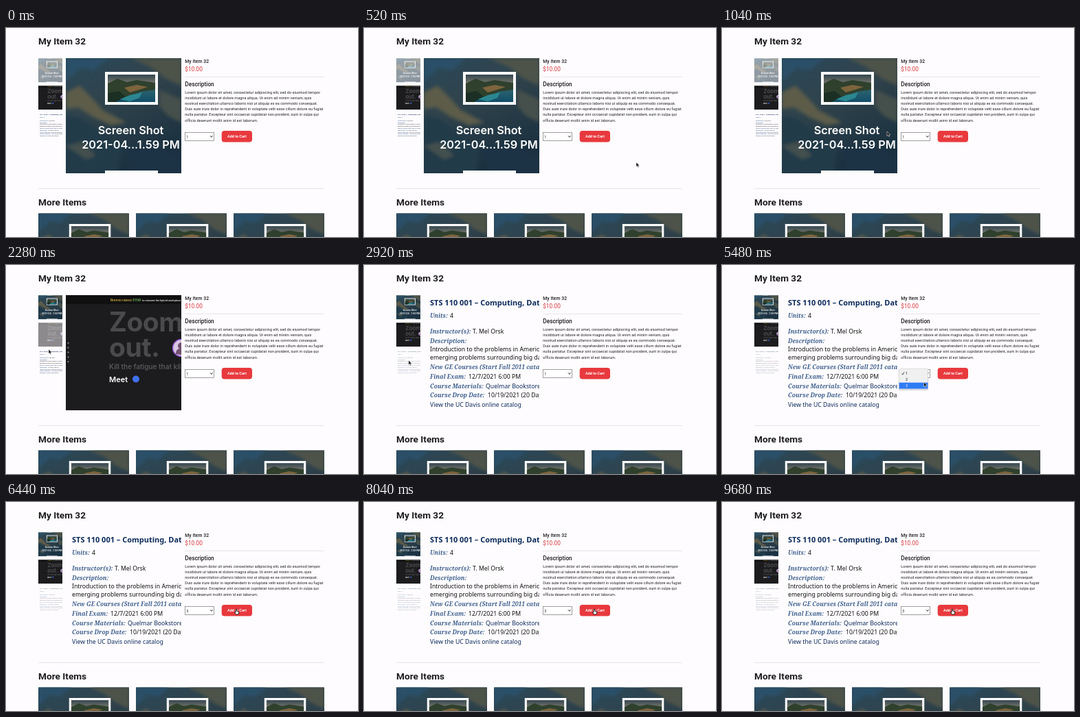
Recreate the animation shown at these times as an HTML page. Size 512 px wide and 305 px high, loop 9920 ms.

```html
<!DOCTYPE html>
<html lang="en">
<head>
<meta charset="utf-8">
<title>Item page</title>
<style>
  html, body { margin: 0; width: 100%; height: 100%; overflow: hidden; background: #fefcfe; }
  svg { display: block; }
  text { white-space: pre; }
  .ui { font-family: Roboto, sans-serif; fill: #1d1c1e; }
  .inter { font-family: Inter, sans-serif; font-weight: 600; }
  .course { font: 8.7px "Noto Sans", sans-serif; fill: #111; }
  .course .label { font: italic bold 8.5px "Noto Serif", serif; fill: #3d5f8c; }
  .course .navy { fill: #0b2a5b; }
  .course .heading { font-size: 11px; font-weight: 700; }
  .body { font-size: 5.46px; letter-spacing: .00938em; }
  .title { font-size: 13.65px; font-weight: 700; }
  .medium { font-weight: 500; }
  .rule { stroke: #dddcde; stroke-width: .7; }
</style>
</head>
<body>
<svg width="512" height="305" viewBox="0 0 512 305">
  <defs>
    <linearGradient id="land" x1="0" y1="0" x2=".5" y2="1">
      <stop offset="0" stop-color="#2a4859"/>
      <stop offset=".45" stop-color="#30434c"/>
      <stop offset="1" stop-color="#1b3140"/>
    </linearGradient>
    <linearGradient id="sky" x1="0" y1="0" x2="0" y2="1">
      <stop offset="0" stop-color="#34454f"/>
      <stop offset=".3" stop-color="#71736a"/>
      <stop offset=".5" stop-color="#2e6670"/>
      <stop offset="1" stop-color="#124d68"/>
    </linearGradient>
    <filter id="soft"><feGaussianBlur stdDeviation="2.5"/></filter>

    <g id="window">
      <rect width="77" height="48" fill="#fbfbfb"/>
      <rect x="4" y="4" width="69" height="40" fill="url(#sky)"/>
      <path d="M4 17 18 10 32 15 46 12 73 16V26L52 29 38 35 22 38 4 41Z" fill="#2f402d"/>
      <path d="M28 23 46 19 62 22 50 26 36 30Z" fill="#7d643d"/>
      <path d="M4 31 20 28 30 36 16 44H4Z" fill="#1b2f24"/>
      <path d="M22 40 36 34 54 30 50 38 36 43Z" fill="#2a8791"/>
    </g>

    <symbol id="image0" viewBox="0 0 168 168">
      <rect width="168" height="168" fill="url(#land)"/>
      <g filter="url(#soft)">
        <path d="M0 0H62L40 18 22 14 0 34Z" fill="#2c5067"/>
        <path d="M0 50 20 40 38 58 54 76 88 94 66 98 40 86 18 72 0 74Z" fill="#5c5b48"/>
        <path d="M94 0H168V40L146 30 122 12Z" fill="#4d5248"/>
        <path d="M136 46 168 60V94L148 84 136 70Z" fill="#45504b"/>
        <path d="M0 84 22 88 46 106 80 134 76 168H0Z" fill="#203a4a"/>
        <path d="M84 134 120 126 168 140V168H96Z" fill="#1c3344"/>
        <path d="M0 128 24 122 44 142 30 148Z" fill="#43504d"/>
      </g>
      <use href="#window" x="57" y="20"/>
      <use href="#window" x="57" y="164"/>
      <g class="inter" font-size="16.3" fill="#fff" text-anchor="middle">
        <text x="94.5" y="111">Screen Shot</text>
        <text x="94.5" y="132">2021-04...1.59 PM</text>
      </g>
    </symbol>

    <symbol id="image1" viewBox="0 0 168 168">
      <rect width="168" height="168" fill="#1c1b1e"/>
      <rect width="168" height="13" fill="#101011"/>
      <path d="M3.5 69V99" stroke="#99989c" stroke-width="1.8" stroke-dasharray="1.8 5"/>
      <g class="inter">
        <text x="65" y="8.6" font-size="4.7" fill="#d9b23c">Brenvo raises <tspan fill="#6fa65a">$15M</tspan></text>
        <text x="111" y="8.6" font-size="3.6" fill="#eee">to reinvent the hybrid workplace</text>
        <g fill="#4a494c" font-size="39" font-weight="700" letter-spacing="-.5">
          <text x="63" y="52.5">Zoom</text>
          <text x="63" y="89.5">out.</text>
        </g>
        <text x="63" y="108" font-size="10" fill="#58575a">Kill the fatigue that kills</text>
        <text x="63" y="127" font-size="11" fill="#fff">Meet</text>
      </g>
      <circle cx="102" cy="122.5" r="5" fill="#3f70ee"/>
      <circle cx="168" cy="77" r="12.5" fill="#d9c5e4" stroke="#8a4fd0" stroke-width="1.5"/>
      <path d="M160 86Q160 79 165 78A5 5 0 1 1 171 78L174 88Z" fill="#70506d"/>
    </symbol>

    <symbol id="image2" viewBox="0 0 168 168">
      <rect width="168" height="168" fill="#fefcfe"/>
      <g class="course">
        <text class="navy heading" x="9" y="15">STS 110 001 – Computing, Data</text>
        <text class="label" x="9" y="33">Units:</text><text x="38" y="33">4</text>
        <text class="label" x="9" y="56">Instructor(s):</text><text x="71" y="56">T. Mel Orsk</text>
        <text class="label" x="9" y="70">Description:</text>
        <text x="9" y="81.5">Introduction to the problems in American</text>
        <text x="9" y="93.5">emerging problems surrounding big data</text>
        <text class="label" x="9" y="108">New GE Courses (Start Fall 2011 catalog)</text>
        <text class="label" x="9" y="121.5">Final Exam:</text><text x="65" y="121.5">12/7/2021 6:00 PM</text>
        <text class="label" x="9" y="135.5">Course Materials:</text><text class="navy" x="90" y="135.5">Quelmar Bookstore</text>
        <text class="label" x="9" y="149">Course Drop Date:</text><text x="93" y="149">10/19/2021 (20 Day Drop)</text>
        <text class="navy" x="9" y="163">View the UC Davis online catalog</text>
      </g>
    </symbol>
  </defs>

  <rect width="512" height="305" fill="#fefcfe"/>
  <g class="ui">
    <text class="title" x="47" y="24.3">My Item 32</text>
    <text class="title" x="47" y="258.7">More Items</text>
    <g class="medium">
      <text x="260.3" y="51" font-size="6.83" letter-spacing=".05">My Item 32</text>
      <text x="260.3" y="84.6" font-size="8.3">Description</text>
    </g>
    <text x="260.3" y="63.2" font-size="8.3" style="fill:#d8383a">$10.00</text>
    <path class="rule" d="M260 71.3H463M47 234.4H463"/>
    <text class="body" y="95.6">
      <tspan x="260.3">Lorem ipsum dolor sit amet, consectetur adipiscing elit, sed do eiusmod tempor</tspan>
      <tspan x="260.3" dy="8.19">incididunt ut labore et dolore magna aliqua. Ut enim ad minim veniam, quis</tspan>
      <tspan x="260.3" dy="8.19">nostrud exercitation ullamco laboris nisi ut aliquip ex ea commodo consequat.</tspan>
      <tspan x="260.3" dy="8.19">Duis aute irure dolor in reprehenderit in voluptate velit esse cillum dolore eu fugiat</tspan>
      <tspan x="260.3" dy="8.19">nulla pariatur. Excepteur sint occaecat cupidatat non proident, sunt in culpa qui</tspan>
      <tspan x="260.3" dy="8.19">officia deserunt mollit anim id est laborum.</tspan>
    </text>
    <rect x="260.5" y="152.5" width="42" height="12" fill="#fff" stroke="#777" stroke-width=".7"/>
    <text id="quantity" x="262.2" y="160.5" font-size="5.46">1</text>
    <path d="M297 157.3l1.8 2 1.8-2" fill="none" stroke="#222"/>
    <rect x="313.7" y="150" width="44.3" height="16.5" rx="4" fill="#e8393d"/>
    <text x="335.9" y="160.4" font-size="5.46" font-weight="700" text-anchor="middle" style="fill:#fff">Add to Cart</text>
  </g>

  <use id="main" href="#image0" x="87" y="44" width="168" height="168"/>
  <g id="thumbs">
    <use href="#image0" x="47" y="44.3" width="35" height="35"/>
    <use href="#image1" x="47" y="84.3" width="35" height="35"/>
    <use href="#image2" x="47" y="124.3" width="35" height="35"/>
  </g>
  <use href="#image0" x="47" y="270.3" width="132" height="132"/>
  <use href="#image0" x="189" y="270.3" width="132" height="132"/>
  <use href="#image0" x="331" y="270.3" width="132" height="132"/>

  <g id="menu" class="ui" font-size="5.46">
    <rect x="257" y="152" width="43" height="31" rx="2.5" fill="#000" opacity=".15"/>
    <rect x="257.3" y="151.3" width="42.4" height="30.5" rx="2.5" fill="#f1f0f1" stroke="#c6c5c7" stroke-width=".5"/>
    <rect id="highlight" x="257.6" width="41.8" height="9" fill="#2f7bf4"/>
    <path id="check" d="M261.5 158.5l1.3 1.6 2.2-3.8" fill="none" stroke-width=".8"/>
    <g id="options">
      <text x="267" y="160.3">1</text>
      <text x="267" y="169.3">2</text>
      <text x="267" y="178.3">3</text>
    </g>
  </g>

  <g id="cursor" stroke-linejoin="round">
    <path d="M0 0V6.6L1.5 5.2 2.6 7.6 3.7 7.1 2.7 4.8H4.8Z" fill="#111" stroke="#fff" stroke-width=".5"/>
    <path d="M-.8 .8Q0-.4 .8 .8V3L3.6 3.8Q4.1 6 2.8 8H-.6L-2.6 5Q-2.4 4-.8 5Z" fill="#fff" stroke="#111" stroke-width=".9"/>
  </g>
</svg>

<script>
const LOOP = 9920;
const SECOND_CLICK = 1760, THIRD_CLICK = 2560, OPEN = 4200, CHOOSE = 5640;
// time, x, y of the pointer tip
const path = [
  [80, 385, 312], [520, 396, 196], [1040, 240, 151], [1640, 68, 104],
  [1960, 66, 106], [2280, 62, 123], [2480, 62, 137], [2880, 63, 139],
  [3640, 284, 155], [3880, 282, 157], [4640, 282, 157], [5160, 293.5, 171],
  [5720, 293.5, 171], [6280, 335, 156]
];
const $ = id => document.getElementById(id);
const ease = u => u * u * (3 - 2 * u);
const show = (node, on) => node.setAttribute('visibility', on ? 'visible' : 'hidden');

function pointerAt(t) {
  const next = path.findIndex(key => key[0] > t);
  if (next === 0) return path[0].slice(1);
  if (next < 0) return path[path.length - 1].slice(1);
  const [a, b] = [path[next - 1], path[next]];
  const u = ease((t - a[0]) / (b[0] - a[0]));
  return [a[1] + (b[1] - a[1]) * u, a[2] + (b[2] - a[2]) * u];
}

function draw(t) {
  const [x, y] = pointerAt(t);
  const selected = t < SECOND_CLICK ? 0 : t < THIRD_CLICK ? 1 : 2;
  $('main').setAttribute('href', '#image' + selected);
  [...$('thumbs').children].forEach((thumb, i) =>
    thumb.setAttribute('opacity', i === selected ? .5 : 1));

  const row = y < 162 ? 0 : y < 170.5 ? 1 : 2;
  show($('menu'), t >= OPEN && t < CHOOSE);
  $('highlight').setAttribute('y', 153.6 + row * 9);
  $('check').setAttribute('stroke', row ? '#1d1c1e' : '#fff');
  [...$('options').children].forEach((option, i) =>
    option.style.fill = i === row ? '#fff' : '#1d1c1e');
  $('quantity').textContent = t < CHOOSE ? 1 : 3;

  const overButton = x > 314 && x < 358 && y > 150 && y < 166;
  const [arrow, hand] = $('cursor').children;
  show(arrow, !overButton);
  show(hand, overButton);
  $('cursor').setAttribute('transform', `translate(${x} ${y})`);
}

function tick(now) {
  draw(now % LOOP);
  requestAnimationFrame(tick);
}
draw(0);
requestAnimationFrame(tick);
</script>
</body>
</html>
```
